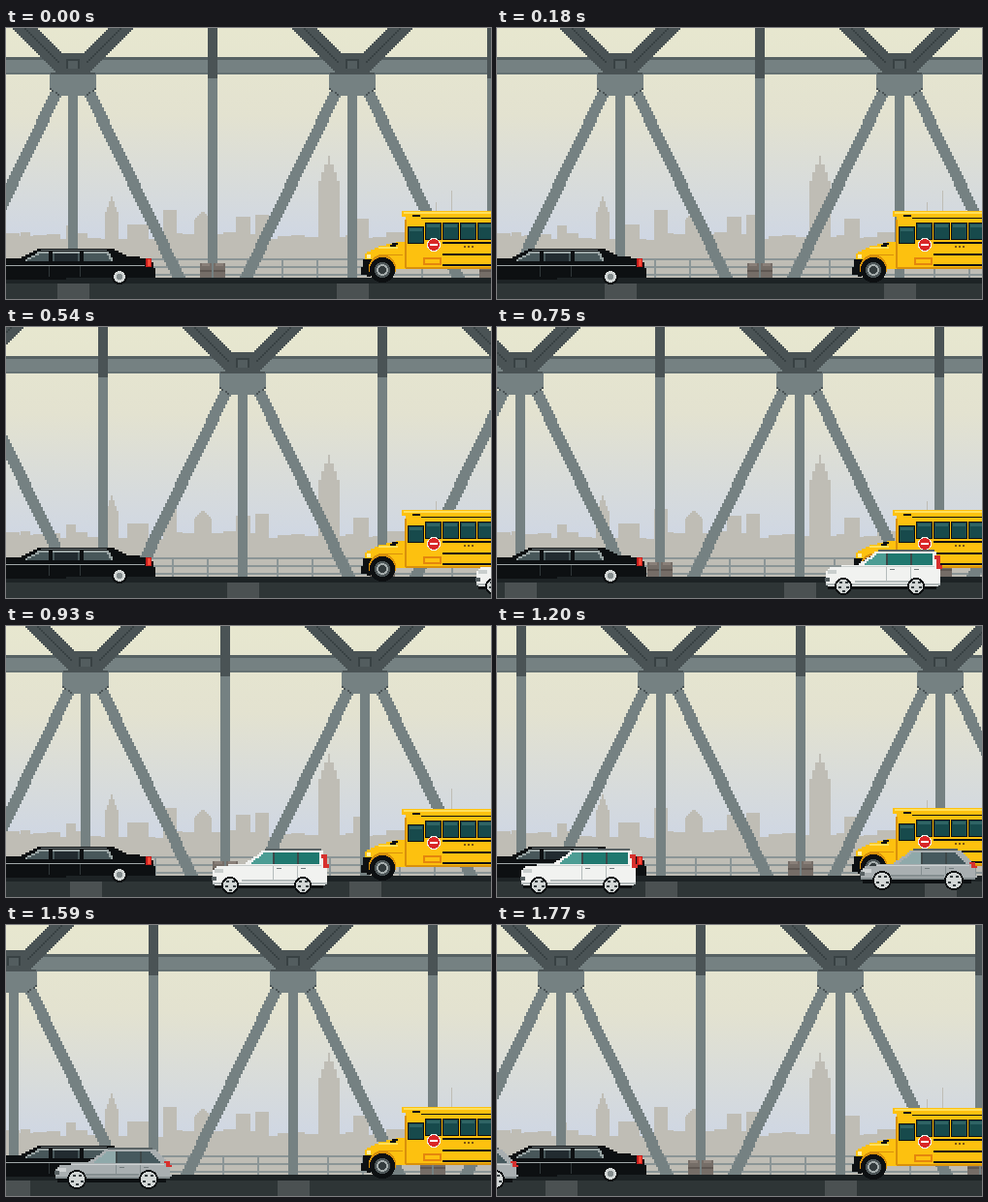
Recreate the animation shown at these times as an HTML page with a canvas. Size 500 by 280 pixels, loop 1.8 s.

```html
<!DOCTYPE html>
<html lang="en">
<head>
<meta charset="utf-8">
<title>Bridge traffic</title>
<style>
html, body { margin: 0; width: 500px; height: 280px; overflow: hidden; }
canvas { display: block; }
</style>
</head>
<body>
<canvas id="stage" width="500" height="280"></canvas>
<script>
const ctx = document.getElementById('stage').getContext('2d');
const SPAN = 288, ROAD = 258;
const STEEL = '#758182', DARK = '#4a5355', LINE = '#384143', BLACK = '#0d1012';

function rect(color, x, y, w, h) {
  ctx.fillStyle = color;
  ctx.fillRect(x, y, w, h);
}

// Fills a polygon in rows of two pixels, snapped to a two pixel grid.
function poly(color, pts) {
  const snap = v => 2 * Math.round(v / 2);
  const ys = pts.map(p => p[1]), bottom = Math.max(...ys);
  for (let y = Math.min(...ys); y < bottom; y += 2) {
    const mid = y + 1, xs = [];
    pts.forEach(([x1, y1], i) => {
      const [x2, y2] = pts[(i + 1) % pts.length];
      if ((y1 <= mid) !== (y2 <= mid)) xs.push(x1 + (mid - y1) * (x2 - x1) / (y2 - y1));
    });
    xs.sort((a, b) => a - b);
    for (let i = 0; i + 1 < xs.length; i += 2) {
      const left = snap(xs[i]);
      rect(color, left, y, snap(xs[i + 1]) - left, Math.min(2, bottom - y));
    }
  }
}

// Slanted bar of constant width between two heights.
function bar(color, x1, y1, x2, y2, w) {
  poly(color, [[x1, y1], [x1 + w, y1], [x2 + w, y2], [x2, y2]]);
}

function disc(color, x, y, r) {
  for (let d = -r; d < r; d++) {
    const w = Math.round(Math.sqrt(r * r - (d + 0.5) ** 2));
    rect(color, x - w, y + d, 2 * w, 1);
  }
}

function wheel(x, y, r, slots) {
  disc(BLACK, x, y, r);
  disc('#d3d7d6', x, y, r - 2);
  for (let i = 0; i < slots; i++) {
    const a = (i + 0.25) * 2 * Math.PI / slots, d = r * 0.5;
    rect('#363d3f', Math.round(x + d * Math.cos(a)) - 1, Math.round(y + d * Math.sin(a)) - 1, 3, 2);
  }
}

function at(x, y, draw) {
  ctx.save();
  ctx.translate(x, y);
  draw();
  ctx.restore();
}

const sky = ctx.createLinearGradient(0, 0, 0, 225);
sky.addColorStop(0, '#e7e7cf');
sky.addColorStop(0.4, '#e3e2d0');
sky.addColorStop(1, '#ced6e4');

function block(x, w, top) {
  rect('#bfbdb5', x, top, w, ROAD - top);
}

// Skyscraper whose tiers narrow towards its tip.
function tower(x, w, top, tip) {
  for (let i = 0; i < 4; i++) {
    const half = Math.round(w / 2 * (1 - i / 3.4));
    block(x - half, 2 * half, Math.round(top + (tip - top) * i / 3));
  }
}

function city() {
  rect(sky, 0, 0, 500, 280);
  let seed = 7;
  for (let x = 0; x < 500; x += 14) {
    seed = seed * 16807 % 2147483647;
    block(x, 14, 211 + seed % 9);
  }
  // Taller buildings: left edge, width, roof
  for (const b of [[15, 10, 211], [62, 10, 204], [125, 22, 203], [162, 14, 188], [194, 18, 198],
    [237, 15, 195], [257, 14, 193], [358, 16, 197], [437, 35, 190]]) block(...b);
  for (let i = 0; i < 4; i++) block(195 + 2 * i, 16 - 4 * i, 196 - 2 * i);
  tower(109, 14, 190, 174);
  tower(333, 22, 158, 132);
  block(443, 1, 180);
  block(459, 1, 168);
}

function rails() {
  for (const y of [238, 246, 254]) rect('#8b9596', -144, y, SPAN, 2);
  for (let x = -144; x < 144; x += 36) rect('#8b9596', x - 1, 238, 2, 20);
}

function truss() {
  rect(STEEL, -144, 30, SPAN, 18);
  rect('#566163', -144, 30, SPAN, 3);
  rect('#667274', -144, 46, SPAN, 2);
  rect(STEEL, -5, 60, 10, ROAD - 60);
  for (const side of [1, -1]) {
    ctx.save();
    ctx.scale(side, 1);
    bar(STEEL, 9, 64, 103, ROAD, 13);
    poly(STEEL, [[0, 48], [23, 48], [23, 62], [14, 70], [0, 70]]);
    bar(DARK, 23, 62, 13, 70, 2);
    poly(DARK, [[37, 0], [63, 0], [16, 47], [0, 47], [0, 27], [10, 27]]);
    bar(LINE, 48, 0, 12, 36, 2);
    ctx.restore();
  }
  rect(DARK, -23, 46, 46, 2);
  rect(LINE, -7, 32, 14, 10);
  rect('#535d5f', -5, 34, 10, 8);
}

function hanger() {
  rect(STEEL, -5, 48, 10, ROAD - 48);
  rect(DARK, -5, 0, 10, 52);
  for (const x of [-13, 1]) {
    rect('#756d67', x, 243, 12, 15);
    rect('#8a8079', x + 2, 243, 8, 3);
    rect('#5f5752', x, 250, 12, 2);
  }
}

function bridge(shift) {
  const first = 69 + shift % SPAN - SPAN;
  const repeat = (draw, offset = 0) => {
    for (let x = first + offset; x < 700; x += SPAN) at(x, 0, draw);
  };
  repeat(rails);
  repeat(truss);
  repeat(hanger, -SPAN / 2);
  rect('#1d2325', 0, ROAD, 500, 6);
  rect('#2e3536', 0, 264, 500, 16);
  repeat(() => rect('#4b5152', -16, 264, 33, 16));
}

function limo() {
  poly(BLACK, [[-2, 238], [14, 238], [34, 228], [110, 228], [126, 236], [150, 238],
    [154, 251], [154, 257], [126, 258], [-2, 260]]);
  poly('#98a3a3', [[34, 231], [106, 231], [112, 242], [16, 242]]);
  poly('#48575a', [[36, 233], [104, 233], [108, 241], [20, 241]]);
  for (const x of [44, 76]) {
    rect(BLACK, x, 230, 4, 13);
    rect('#303739', x, 245, 1, 12);
  }
  rect('#222b30', 50, 233, 24, 8);
  rect('#6c7577', 36, 229, 68, 1);
  rect('#a0a8a8', 0, 245, 143, 1);
  rect('#c41d1d', 144, 238, 6, 9);
  rect('#ff4a35', 146, 239, 3, 7);
  wheel(117, 257, 8, 0);
  disc('#858d8e', 117, 257, 3);
}

function bus() {
  const yellow = '#fdc10f', shade = '#d9910b';
  poly(yellow, [[408, 189], [502, 189], [502, 249], [400, 249], [370, 242], [371, 233],
    [383, 226], [411, 220], [411, 196], [408, 195]]);
  rect('#ffe05a', 410, 190, 90, 2);
  rect(BLACK, 419, 193, 8, 2);
  rect(BLACK, 428, 196, 72, 1);
  rect(shade, 411, 198, 2, 50);
  rect(shade, 412, 247, 88, 2);
  // Windows
  for (let x = 414; x < 500; x += 18) {
    const y = x === 414 ? 205 : 201;
    rect(BLACK, x, y, 17, 18);
    rect('#174a4c', x + 1, y + 1, 15, 16);
    rect('#2f6465', x + 2, y + 2, 13, 3);
  }
  for (const y of [221, 233, 244]) rect(BLACK, 450, y, 50, 2);
  for (let x = 472; x < 484; x += 4) rect('#805510', x, 225, 2, 2);
  rect('#e4860d', 430, 237, 19, 8);
  rect(yellow, 432, 239, 15, 4);
  // Stop sign
  disc('#eef0ea', 441, 224, 7);
  disc('#d92627', 441, 224, 6);
  rect('#fff', 437, 223, 8, 2);
  // Hood and bumper
  rect('#ffe05a', 384, 226, 20, 2);
  rect(shade, 386, 234, 23, 1);
  bar(BLACK, 400, 222, 394, 226, 6);
  rect('#fff0a8', 372, 234, 4, 4);
  poly(BLACK, [[368, 239], [380, 239], [376, 257], [366, 255]]);
  disc(shade, 388, 248, 14);
  for (const [color, r] of [[BLACK, 13], ['#4d5658', 8], ['#a5adad', 6], ['#343c3e', 4]]) {
    disc(color, 388, 250, r);
  }
}

// Both cars share one outline; the hatch, sill, wheels and lamp set them apart.
function car({ paint, shine, shade, glass, pale, hatch, sill, wheels, r, lamp }) {
  rect(BLACK, 4, sill - 2, 112, 5);
  poly(paint, [[54, 232], [hatch, 232], [119, 245], [121, sill - 4], [116, sill], [4, sill],
    [1, sill - 6], [2, 253], [8, 248], [36, 245]]);
  rect('#596264', 56, 230, hatch - 58, 2);
  poly(glass, [[56, 234], [hatch - 4, 234], [111, 246], [40, 246]]);
  poly(pale, [[56, 234], [64, 234], [64, 246], [40, 246]]);
  for (const x of [64, 89]) {
    rect('#3d4748', x, 234, 2, 12);
    rect(shade, x, 248, 1, sill - 252);
    rect('#737c7e', x + 4, 250, 5, 1);
  }
  rect(shine, 18, 247, 96, 1);
  rect(shade, 32, sill - 6, 56, 2);
  rect(shade, 2, sill - 3, 118, 2);
  rect(shine, 4, 251, 9, 4);
  rect('#596264', 1, sill - 9, 5, 4);
  bar('#d7302d', 114, lamp, 117, 250, 5);
  for (const x of wheels) wheel(x, sill, r, 5);
}

const suv = {
  paint: '#f1f2f0', shine: '#c9cecd', shade: '#b4bbbb', glass: '#1f786f', pale: '#4c9d94',
  hatch: 116, sill: 268, wheels: [20, 95], r: 9, lamp: 236,
};
const wagon = {
  paint: '#a9afb1', shine: '#cdd1d2', shade: '#858e90', glass: '#46595e', pale: '#8fa9aa',
  hatch: 104, sill: 263, wheels: [24, 98], r: 10, lamp: 244,
};

function frame() {
  const n = Math.floor(performance.now() % 1800 / 30);
  const bob = Math.max(0, Math.sin((n - 31) * Math.PI / 30));
  city();
  bridge(Math.floor(9.724 * n));
  limo();
  at(0, -Math.round(bob), bus);
  at(Math.round(859 - 20.9 * n), 0, () => car(suv));
  at(Math.round(1369 - 24.9 * n), 0, () => car(wagon));
  requestAnimationFrame(frame);
}
frame();
</script>
</body>
</html>
```
